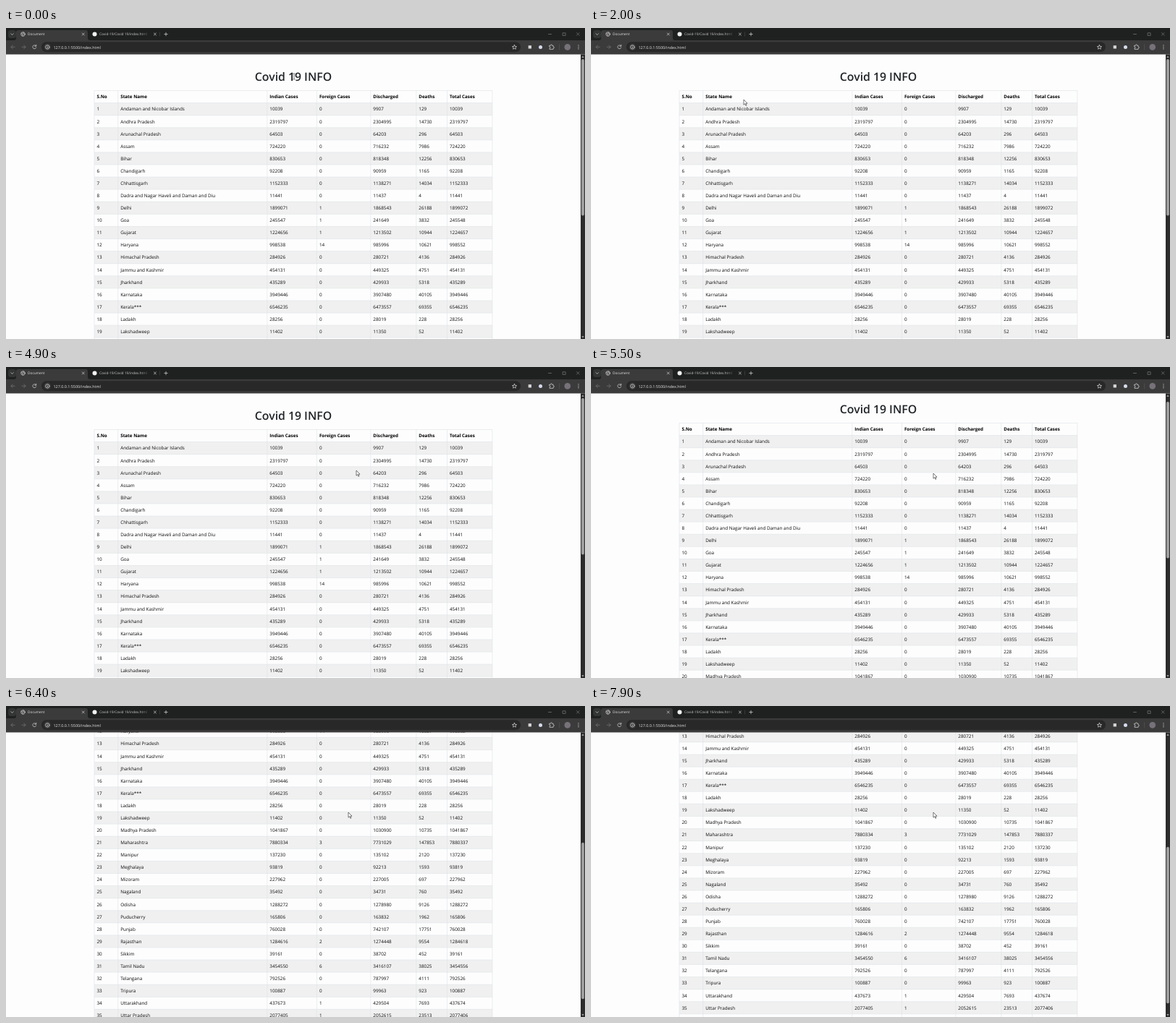
Animation, 800 px wide and 430 px high, one loop 8000 ms. Source, as an HTML page:

```html
<!DOCTYPE html>
<html lang="en">
<head>
<meta charset="utf-8">
<title>Covid 19 INFO</title>
<style>
html, body { margin: 0; width: 100%; height: 100%; overflow: hidden; background: #fdfdfd }
svg { display: block; font-family: "Open Sans", "Noto Sans", sans-serif; text-rendering: geometricPrecision }
text { white-space: pre }
.cell { font-size: 6.33px; fill: #0c0c0c }
.head { font-size: 6.25px; font-weight: 700; fill: #000 }
.grid { stroke: #dee2e6; stroke-width: .6; fill: none }
.icon { stroke: #c9c9c9; stroke-width: .8; fill: none; stroke-linecap: round; stroke-linejoin: round }
.dim { stroke: #717171 }
</style>
</head>
<body>
<svg width="800" height="430" viewBox="0 0 800 430">
  <g id="page">
    <text x="397" y="73" text-anchor="middle" font-size="15.8" font-weight="600" fill="#212529">Covid 19 INFO</text>
    <g id="table"></g>
  </g>

  <!-- browser frame -->
  <path d="M0 0H800V17H0z" fill="#1f2020"/>
  <path d="M0 17H800V36.5H0zM11 17q3 0 3-3V6q0-3 3-3H110q3 0 3 3v8q0 3 3 3z" fill="#3b3b3b"/>
  <rect x="49" y="19.3" width="662" height="14" rx="7" fill="#282828"/>
  <rect x="3" y="3" width="11" height="11" rx="3.5" fill="#343535"/>
  <path class="icon" d="M6.8 7.8l1.7 1.7 1.7-1.7"/>
  <g class="icon" stroke-width=".7">
    <circle cx="23.5" cy="8.5" r="2.8"/>
    <path d="M21 7.5l2 1 .3 2.5M24 6l-.4 1.7 2.5.9"/>
    <path d="M105.2 7l3 3m0-3l-3 3M204.4 7l3 3m0-3l-3 3M221 6.3v4.4m-2.2-2.2h4.4"/>
    <path class="dim" d="M749.5 8.5h4M769.5 6.8h3.6v3.6h-3.6zM788.5 6.6l3.6 3.6m0-3.6l-3.6 3.6"/>
  </g>
  <path d="M212.5 5.5v6" stroke="#4b4b4b" stroke-width=".6"/>
  <circle cx="122.5" cy="8.5" r="3" fill="#f2f2f2"/>
  <text x="30" y="10.4" font-size="4.8" fill="#e4e4e4">Document</text>
  <linearGradient id="fade" gradientUnits="userSpaceOnUse" x1="186" x2="200" y1="0" y2="0">
    <stop stop-color="#c9c9c9"/><stop offset="1" stop-color="#1f2020"/>
  </linearGradient>
  <text x="129" y="10.4" font-size="4.8" fill="url(#fade)">Covid-19/Covid 19/index.html</text>

  <g class="icon">
    <path class="dim" d="M12 26.3H7m2.3-2.4L7 26.3l2.3 2.4M22 26.3h5m-2.3-2.4l2.3 2.4-2.3 2.4"/>
    <path d="M41.4 24.8a2.5 2.5 0 1 0 .3 2.3M41.7 23.3v1.9h-1.9"/>
  </g>
  <circle cx="57.3" cy="26.4" r="4.8" fill="#3b3b3b"/>
  <g class="icon" stroke-width=".7">
    <circle cx="57.3" cy="26.4" r="2.7"/>
    <path d="M57.3 26.2v1.5M57.3 24.9v.1"/>
    <path d="M702.5 23.4l.9 2 2.2.2-1.7 1.5.5 2.1-1.9-1.1-1.9 1.1.5-2.1-1.7-1.5 2.2-.2z"/>
    <path d="M751 24.3h1.5q0-1.4 1-1.4t1 1.4h1.6v1.6q1.3 0 1.3 1t-1.3 1v1.5H751v-1.6q1.2 0 1.2-.9T751 25.900z"/>
  </g>
  <text x="65.500" y="28.500" font-size="5.400" fill="#e6e6e6">127.0.0.1:5500/index.html</text>
  <rect x="721.700" y="24.200" width="4.300" height="4.300" fill="#d6d6d6"/>
  <circle cx="738.500" cy="26.400" r="2.500" fill="#d5dced"/>
  <path d="M764.500 22.500v8" stroke="#5a5a5a" stroke-width=".6"/>
  <circle cx="775.800" cy="26.400" r="4.300" fill="#77717a"/>
  <path d="M791 23.900v.1m0 2.300v.1m0 2.300v.1" stroke="#d0d0d0" stroke-width="1.200" stroke-linecap="round"/>

  <!-- scrollbar -->
  <rect x="794" y="36.500" width="6" height="393.500" fill="#2c2c2c"/>
  <path d="M795.300 41l1.700-2.500 1.700 2.500zM795.300 426l1.700 2.500 1.700-2.500z" fill="#a0a0a0"/>
  <rect id="thumb" x="795" y="43" width="4" height="216.500" rx="2" fill="#9d9d9d"/>

  <path id="arrow" d="M0 0V7.200L1.700 5.700 2.900 8.300 4 7.800 2.800 5.200H5z" fill="#fff" stroke="#222" stroke-width=".6"/>
  <path id="beam" d="M-1.600-4H-.4L0-3.600.4-4H1.600M0-3.600V3.600M-1.600 4H-.4L0 3.600.4 4H1.600" fill="none" stroke="#333" stroke-width=".7"/>
</svg>
<script>
// name, Indian cases, discharged, deaths, foreign cases (if any)
const states = `Andaman and Nicobar Islands,10039,9907,129
Andhra Pradesh,2319797,2304995,14730
Arunachal Pradesh,64503,64203,296
Assam,724220,716232,7986
Bihar,830653,818348,12256
Chandigarh,92208,90959,1165
Chhattisgarh,1152333,1138271,14034
Dadra and Nagar Haveli and Daman and Diu,11441,11437,4
Delhi,1899071,1868543,26188,1
Goa,245547,241649,3832,1
Gujarat,1224656,1213502,10944,1
Haryana,998538,985996,10621,14
Himachal Pradesh,284926,280721,4136
Jammu and Kashmir,454131,449325,4751
Jharkhand,435289,429933,5318
Karnataka,3949446,3907480,40105
Kerala***,6546235,6473557,69355
Ladakh,28256,28019,228
Lakshadweep,11402,11350,52
Madhya Pradesh,1041867,1030900,10735
Maharashtra,7880334,7731029,147853,3
Manipur,137230,135102,2120
Meghalaya,93819,92213,1593
Mizoram,227962,227005,697
Nagaland,35492,34731,760
Odisha,1288272,1278980,9126
Puducherry,165806,163832,1962
Punjab,760028,742107,17751
Rajasthan,1284616,1274448,9554,2
Sikkim,39161,38702,452
Tamil Nadu,3454550,3416107,38025,6
Telangana,792526,787997,4111
Tripura,100887,99963,923
Uttarakhand,437673,429504,7693,1
Uttar Pradesh,2077405,2052615,23513,1`.split("\n");

const $ = id => document.getElementById(id);
const LEFT = 122, RIGHT = 672, TOP = 86.5, ROW = 41 / 2.4;
const columns = [122, 154.7, 360.8, 429.4, 503.8, 566.8, 609.5];

const rowMarkup = (cells, i) => {
  const y = TOP + i * ROW;
  const stripe = i % 2 ? `<rect x="${LEFT}" y="${y}" width="${RIGHT - LEFT}" height="${ROW}" fill="#f0f0f0"/>` : "";
  const texts = cells.map((cell, c) =>
    `<text class="${i ? "cell" : "head"}" x="${columns[c] + 3.5}" y="${y + 10.9}">${cell}</text>`);
  return stripe + texts.join("") + `<path class="grid" d="M${LEFT} ${y}H${RIGHT}"/>`;
};

const rows = states.map((line, i) => {
  const [name, indian, discharged, deaths, foreign = 0] = line.split(",");
  return [i + 1, name, indian, foreign, discharged, deaths, +indian + +foreign];
});
rows.unshift(["S.No", "State Name", "Indian Cases", "Foreign Cases", "Discharged", "Deaths", "Total Cases"]);
rows.push([]);
const borders = [...columns, RIGHT].map(x => `M${x} ${TOP}v${rows.length * ROW}`).join("");
$("table").innerHTML = rows.map(rowMarkup).join("") + `<path class="grid" d="${borders}"/>`;

// keys: [time, value, ...]
const scrollKeys = [[5400, 0], [5600, 18], [5800, 55], [6000, 107.3], [6200, 195], [6400, 265], [6600, 275.7]];
const pointerKeys = [[200, 398, 67], [1000, 300, 82], [1800, 211, 99], [2000, 211, 99], [3200, 358, 113],
  [4700, 484, 143], [5000, 484, 143], [5500, 473, 147]];

function at(keys, t) {
  const next = keys.findIndex(k => k[0] > t);
  if (next < 0) return keys[keys.length - 1].slice(1);
  if (!next) return keys[0].slice(1);
  const a = keys[next - 1], b = keys[next], p = (t - a[0]) / (b[0] - a[0]);
  return a.slice(1).map((v, i) => v + (b[i + 1] - v) * p);
}

function draw() {
  const t = Math.floor(performance.now() % 8000 / 100) * 100;
  const [scroll] = at(scrollKeys, t), [x, y] = at(pointerKeys, t);
  $("page").setAttribute("transform", `translate(0 ${-scroll})`);
  $("thumb").setAttribute("y", 43 + scroll * .55);
  const overTitle = x > 343 && y < 78;
  for (const id of ["arrow", "beam"]) {
    $(id).setAttribute("transform", `translate(${x} ${y})`);
    $(id).style.display = (id === "beam") === overTitle ? "" : "none";
  }
  requestAnimationFrame(draw);
}
draw();
</script>
</body>
</html>
```
